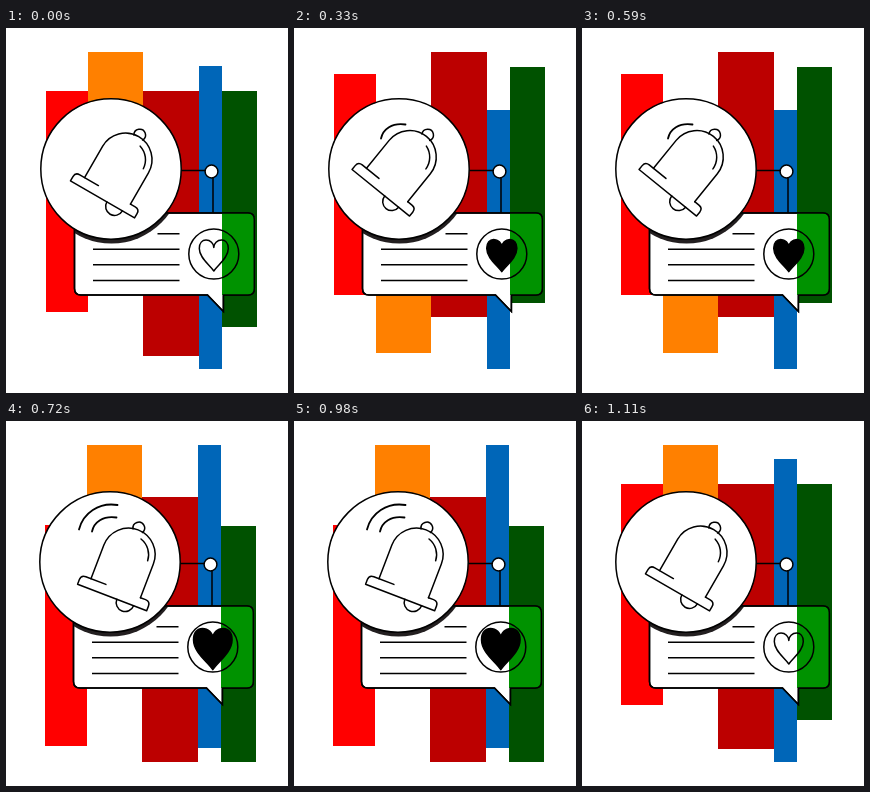
An HTML page for the animation above (1.44 s loop, 282 by 365 pixels).

```html
<!DOCTYPE html>
<html lang="en">
<head>
<meta charset="utf-8">
<title>Notification bell</title>
<style>
  html, body { margin: 0; width: 100%; height: 100%; overflow: hidden; background: #fff; }
  svg { display: block; width: 282px; height: 365px; }
  .ink { fill: none; stroke: #000; stroke-width: 1.5; }
  .paper { fill: #fff; }
  .round { stroke-linecap: round; stroke-linejoin: round; }
</style>
</head>
<body>
<svg viewBox="0 0 282 365">
  <defs>
    <path id="bubble" d="M75 185H242Q248.300 185 248.300 191.500V260.500Q248.300 267 242 267H217.400V283.500L201.500 267H75Q68.500 267 68.500 260.500V191.500Q68.500 185 75 185Z"/>
    <clipPath id="inside"><use href="#bubble"/></clipPath>
  </defs>
  <g id="scene">
    <g id="bars"></g>
    <g class="ink">
      <path d="M174 142.500H200M207 149V185"/>
      <circle class="paper" cx="205.500" cy="143.500" r="6.400"/>
      <use href="#bubble" class="paper"/>
      <g clip-path="url(#inside)" stroke="none">
        <path fill="#009200" d="M216 185H249V267H216Z"/>
        <circle fill="#231f20" cx="105.500" cy="145" r="70.500"/>
      </g>
      <use href="#bubble"/>
      <path d="M151.500 205.700H173.500M87 221.200H173.500M87 236.800H173.500M87 252.400H173.500"/>
      <circle cx="207.800" cy="226" r="25"/>
      <path id="heart" vector-effect="non-scaling-stroke" stroke-linejoin="round"
        d="M0 17C-4 11-14.500 4-14.500-5.500C-14.500-11-11.500-14-7.800-14C-3.500-14 0-10.500 0-6.500C0-10.500 3.500-14 7.800-14C11.500-14 14.500-11 14.500-5.500C14.500 4 4 11 0 17Z"/>
      <circle class="paper" cx="105" cy="141" r="70.200"/>
      <g id="bell" class="round">
        <path d="M5 75A9 9 0 0 0 23 75"/>
        <path class="paper" d="M-5 3.500A5.800 5.800 0 1 1 5 3.500"/>
        <path d="M-26.500 65V29A26.500 26.500 0 0 1 26.500 29V65"/>
        <path d="M-10.500 65H-32Q-37 65-37 70V75H37V70Q37 65 32 65H26.500"/>
        <path d="M6 10A20 20 0 0 1 20 28"/>
      </g>
      <g class="round" stroke-width="1.800">
        <path id="near" d="M87 110.500C89 101 98 94.500 111.500 96.500"/>
        <path id="far" d="M74 108.500C78 92 94 81 112.500 84"/>
      </g>
    </g>
  </g>
</svg>
<script>
const el = id => document.getElementById(id);

// x, width, colour
const columns = [
  [40, 42, '#ff0000'], [82, 55, '#ff8000'], [137, 56, '#bc0000'],
  [193, 23, '#0066b8'], [216, 35, '#005200']
];
// spans: [top, bottom] of each column
const poses = {
  rest: { spans: [[63, 284], [24, 245], [63, 328], [38, 341], [63, 299]], tilt: 30, heart: 1, rings: 0 },
  left: { spans: [[46, 267], [104, 325], [24, 289], [82, 341], [39, 275]], tilt: 39, heart: 1.04, rings: 1 },
  right: { spans: [[104, 325], [24, 245], [76, 341], [24, 327], [105, 341]], tilt: 21, heart: 1.33, rings: 2 }
};
const LOOP = 1440, REST = 330, BEAT = 130;

const rects = columns.map(([x, width, fill]) => {
  const r = document.createElementNS('http://www.w3.org/2000/svg', 'rect');
  for (const [k, v] of Object.entries({ x, width, fill })) r.setAttribute(k, v);
  return el('bars').appendChild(r);
});

function poseAt(t) {
  if (t < REST || t >= LOOP - REST) return poses.rest;
  return Math.floor((t - REST) / BEAT) % 2 ? poses.right : poses.left;
}

function draw(t) {
  const p = poseAt(t);
  const nudge = t >= REST + 2 * BEAT ? -1 : 0;
  el('scene').setAttribute('transform', `translate(${nudge})`);
  rects.forEach((r, i) => {
    const [top, bottom] = p.spans[i];
    r.setAttribute('y', top);
    r.setAttribute('height', bottom - top);
  });
  el('bell').setAttribute('transform', `translate(134 106.500) rotate(${p.tilt})`);
  el('heart').setAttribute('transform', `translate(207.800 226) scale(${p.heart})`);
  el('heart').setAttribute('fill', p.rings ? '#000' : 'none');
  el('near').setAttribute('visibility', p.rings > 0 ? 'visible' : 'hidden');
  el('far').setAttribute('visibility', p.rings > 1 ? 'visible' : 'hidden');
}

let start;
function tick(now) {
  start ??= now;
  draw((now - start) % LOOP);
  requestAnimationFrame(tick);
}
draw(0);
requestAnimationFrame(tick);
</script>
</body>
</html>
```
